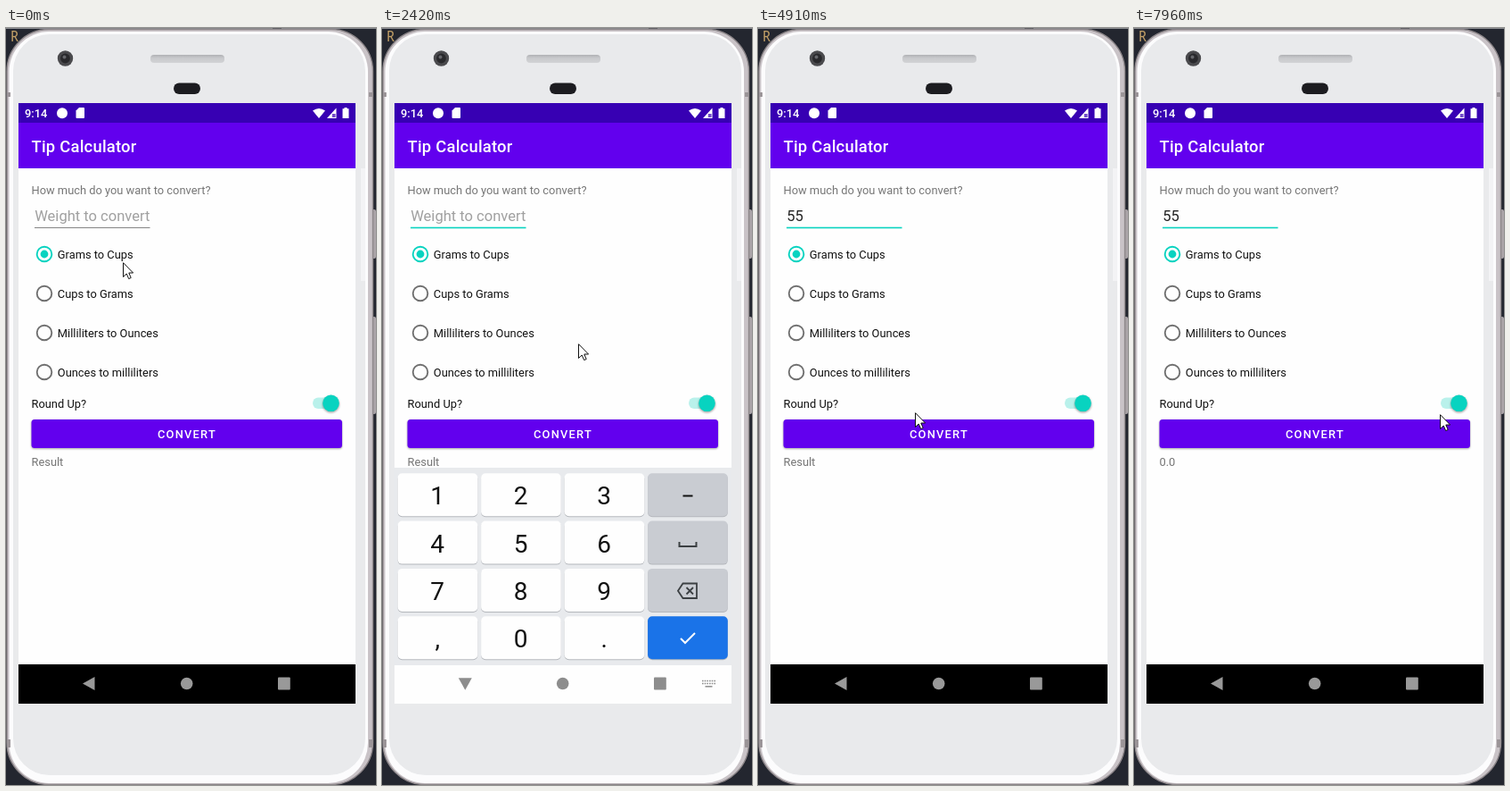
An HTML page for the animation above (8 s loop, 415 by 847 pixels).

```html
<!DOCTYPE html>
<html lang="en">
<head>
<meta charset="utf-8">
<title>Unit converter demo</title>
<style>
html, body { margin: 0; width: 100%; height: 100%; overflow: hidden; background: #23262f; }
svg { display: block; width: 415px; height: 847px; }
text { font-family: Roboto, sans-serif; font-size: 12.87px; fill: #111; white-space: pre; }
.med { font-weight: 500; }
.gray { fill: #767676; }
.field { font-size: 16.55px; }
.key { font-size: 28px; text-anchor: middle; }
</style>
</head>
<body>
<svg viewBox="0 0 415 847">
  <defs>
    <clipPath id="screen"><rect x="14" y="84" width="378" height="672"/></clipPath>
    <clipPath id="btn"><rect x="28.500" y="438" width="348.500" height="32" rx="3.500"/></clipPath>
    <linearGradient id="slot" x2="0" y2="1">
      <stop offset="0" stop-color="#b0b1b4"/><stop offset=".4" stop-color="#c8c9cc"/><stop offset="1" stop-color="#d2d3d5"/>
    </linearGradient>
    <filter id="soft" x="-30%" y="-30%" width="160%" height="170%"><feGaussianBlur stdDeviation="1"/></filter>
  </defs>

  <!-- desktop and phone body -->
  <rect width="415" height="847" fill="#23262f"/>
  <rect width="415" height="1" fill="#8b8c90"/>
  <text x="5" y="15" style="font:15.5px 'Noto Sans Mono',monospace;fill:#c2a067">R</text>
  <rect x="299" y="0" width="10" height="4" fill="#55575d"/>
  <g fill="#aaa4a8">
    <rect x="410" y="203" width="5" height="55" rx="2"/>
    <rect x="410" y="323" width="5" height="109" rx="2"/>
  </g>
  <rect x="1" y="1.500" width="410.500" height="845" rx="47" fill="#c9c3c7" stroke="#8c8689" stroke-width="1.400"/>
  <rect x="3.500" y="4" width="402.500" height="841" rx="45" fill="#fcfcfd"/>
  <g fill="#9b9598">
    <rect x="1" y="72" width="4" height="5"/><rect x="407" y="72" width="4.500" height="5"/>
    <rect x="1" y="796" width="4" height="9"/><rect x="407" y="796" width="4.500" height="9"/>
  </g>
  <rect x="8" y="7" width="395" height="829" rx="41" fill="#e9eaec"/>
  <rect x="398" y="157" width="5" height="126" fill="#f3f3f5"/>
  <rect x="162" y="30" width="83" height="9" rx="4" fill="url(#slot)"/>
  <circle cx="66.500" cy="34" r="8.700" fill="#4a4a4d"/>
  <circle cx="66.500" cy="34" r="5.400" fill="#29292c"/>
  <circle cx="65.500" cy="32.500" r="2" fill="#66676b"/>
  <rect x="188" y="61.500" width="30" height="12.500" rx="6.200" fill="#1c1c20"/>

  <g clip-path="url(#screen)">
    <rect x="14" y="84" width="378" height="672" fill="#fefefe"/>
    <rect x="14" y="84" width="378" height="22" fill="#3700b3"/>
    <rect x="14" y="106" width="378" height="51" fill="#6200ee"/>
    <text class="med" x="21" y="100" style="fill:#fff">9:14</text>
    <g fill="#fff">
      <circle cx="63" cy="95.300" r="6"/>
      <path d="M82 89h5q1 0 1 1v10q0 1-1 1h-7.500q-1 0-1-1V92.500z"/>
      <path d="M344 92.500q7-5 14 0L351 101z"/>
      <path d="M370.500 89.500V101H360z"/>
      <path d="M379.500 89h3v1.300h2V101h-7V90.300h2z"/>
    </g>
    <path d="M365.800 96v4h3.800v-4z" fill="#3700b3" opacity=".7"/>
    <text class="med" x="28.500" y="138.500" style="font-size:18.4px;letter-spacing:.23px;fill:#fff">Tip Calculator</text>

    <text class="gray" x="28.500" y="185.500">How much do you want to convert?</text>
    <text id="value" class="field" x="32.200" y="216.300"></text>
    <rect id="line" x="32" width="129.500"/>
    <rect id="caret" y="198" width="2" height="23" fill="#08d3c0"/>
    <g id="radios"></g>

    <text x="28.500" y="424.600">Round Up?</text>
    <rect x="344" y="413.500" width="28" height="12.500" rx="6.200" fill="#b9f1eb"/>
    <circle cx="364.500" cy="421" r="9.500" fill="#000" opacity=".35" filter="url(#soft)"/>
    <circle cx="364.500" cy="419.800" r="9.300" fill="#08d3c0"/>

    <rect x="28.500" y="439" width="348.500" height="32" rx="3.500" opacity=".35" filter="url(#soft)"/>
    <rect x="28.500" y="438" width="348.500" height="32" rx="3.500" fill="#6200ee"/>
    <circle id="ripple" cx="226" cy="460" fill="#fff" clip-path="url(#btn)"/>
    <text class="med" x="170" y="459.200" style="fill:#fff;letter-spacing:1.2px">CONVERT</text>
    <text id="result" class="gray" x="28.500" y="490"></text>

    <rect x="14" y="712" width="378" height="44"/>
    <g id="board"></g>
    <g id="nav">
      <path id="back" d="M86 733.500L99.500 726v15z"/>
      <circle cx="202.700" cy="733.500" r="6.800"/>
      <rect x="305" y="726.500" width="13.800" height="14" rx="1"/>
    </g>
    <g id="switcher" stroke="#8d8d8d" stroke-width="1.500">
      <path d="M359 730.500h15M359 733.500h15" stroke-dasharray="1.600 1.080"/>
      <path d="M362.500 736.800h8"/>
    </g>
  </g>
  <path id="mouse" d="M.5.700V16.500L4.200 13L6.700 18.600L9.200 17.500L6.800 12H11.600z" fill="#fff" stroke="#111"/>
</svg>
<script>
const LOOP = 8000, TEAL = '#08d3c0';
const $ = id => document.getElementById(id);
const clamp = v => Math.max(0, Math.min(1, v));
const part = (t, from, length) => clamp((t - from) / length);
const within = (t, a, b) => t >= a && t < b;

function radios() {
  const names = ['Grams to Cups', 'Cups to Grams', 'Milliliters to Ounces', 'Ounces to milliliters'];
  $('radios').innerHTML = names.map((name, i) => {
    const y = 253 + 44 * i;
    return `<circle cx="43" cy="${y}" r="8.300" fill="none" stroke="${i ? '#707070' : TEAL}" stroke-width="1.900"/>` +
      (i ? '' : `<circle cx="43" cy="${y}" r="4.400" fill="${TEAL}"/>`) +
      `<text x="57.800" y="${y + 5}">${name}</text>`;
  }).join('');
}

function keyboard() {
  let out = '<rect x="14" y="492" width="378" height="221" fill="#e8eaed"/>' +
    '<rect x="14" y="713" width="378" height="48" fill="#fefefe"/>';
  ['123-', '456_', '789<', ',0.!'].forEach((row, r) => [...row].forEach((k, c) => {
    const x = 17.6 + 93.5 * c, y = 498.3 + 53.3 * r;
    const fill = k === '!' ? '#1a73e8' : c === 3 ? '#c9ccd2' : '#fefefe';
    const box = (dy, color, id = '') =>
      `<rect ${id} x="${x}" y="${y + dy}" width="89.700" height="48" rx="5" fill="${color}"/>`;
    out += box(1, '#b4b7bc') + box(0, fill, k === '5' ? 'id="five"' : '');
    if (c < 3) out += `<text class="key" x="${x + 44.6}" y="${y + 34.95}">${k}</text>`;
  }));
  out += '<g fill="none" stroke="#3c4043" stroke-width="2">' +
    '<path d="M337.500 523.500h11" stroke="#111"/>' +
    '<path d="M333.500 575v5h19v-5"/>' +
    '<path d="M337.500 621.500h15.500v16.500h-15.500l-5.500-8.200zM341.500 626l7.500 7.500m0-7.500l-7.500 7.500" stroke-width="1.800"/>' +
    '<path d="M335 683l5 5l11-11" stroke="#fff"/></g>';
  $('board').innerHTML = out;
}

// time, x, y of the pointer tip
const path = [
  [0, 131, 262], [60, 131, 262], [640, 76, 215], [900, 76, 215], [1230, 226, 327],
  [2330, 226, 327], [2780, 172, 570], [3480, 172, 570], [3900, 347, 668],
  [4220, 347, 668], [4910, 176, 430], [5000, 176, 430], [5480, 226, 460],
  [6120, 226, 460], [6500, 187, 427], [7260, 187, 427], [7720, 322, 442], [7960, 343, 432], [LOOP, 343, 432]
];
function pointer(t) {
  const i = path.findIndex(p => p[0] > t), a = path[i - 1], b = path[i];
  const p = part(t, a[0], b[0] - a[0]), e = p * p * (3 - 2 * p);
  return [a[1] + (b[1] - a[1]) * e, a[2] + (b[2] - a[2]) * e];
}

// the caret flips at each of these moments, hidden at first
const blinks = [880, 1400, 1900, 2390, 2900, 3900, 4400, 4860, 5350, 5880, 6320, 6800, 7290, 7800];

function set(id, attrs) {
  for (const k in attrs) $(id).setAttribute(k, attrs[k]);
}

function draw(t) {
  const typed = t < 2900 ? '' : t < 3440 ? '5' : '55';
  const focus = t >= 880;
  $('value').textContent = typed || 'Weight to convert';
  $('value').style.fill = typed ? '#222' : '#a0a0a0';
  set('line', { y: focus ? 222.7 : 223, height: focus ? 1.6 : 1, fill: focus ? TEAL : '#858585' });
  set('caret', {
    x: 32 + 9.2 * typed.length,
    opacity: blinks.filter(b => b <= t).length % 2
  });

  const show = part(t, 1080, 260), hide = part(t, 3960, 205) ** 2;
  const alpha = Math.min(1, show * 2) * (1 - hide);
  set('board', {
    opacity: alpha,
    transform: `translate(0 ${26 * ((1 - show) ** 2 + hide)})`
  });
  set('switcher', { opacity: within(t, 1140, 3960) ? 1 : 0 });
  set('five', { fill: within(t, 2810, 2900) || within(t, 3360, 3440) ? '#e3e3e3' : '#fefefe' });
  set('nav', { fill: alpha > .5 ? '#8d8d8d' : '#999' });
  const turn = part(t, 1330, 140) - part(t, 4100, 140);
  set('back', { transform: `rotate(${-90 * turn} 93.300 733.500)` });

  set('ripple', {
    r: 20 + 190 * part(t, 5880, 225),
    opacity: t < 5880 ? 0 : .24 * (1 - part(t, 6050, 270))
  });
  $('result').textContent = t < 6000 ? 'Result' : '0.0';
  set('mouse', { transform: `translate(${pointer(t).map(Math.round)})` });
}

radios();
keyboard();
const start = performance.now();
function tick() {
  draw((performance.now() - start) % LOOP);
  requestAnimationFrame(tick);
}
tick();
</script>
</body>
</html>
```
